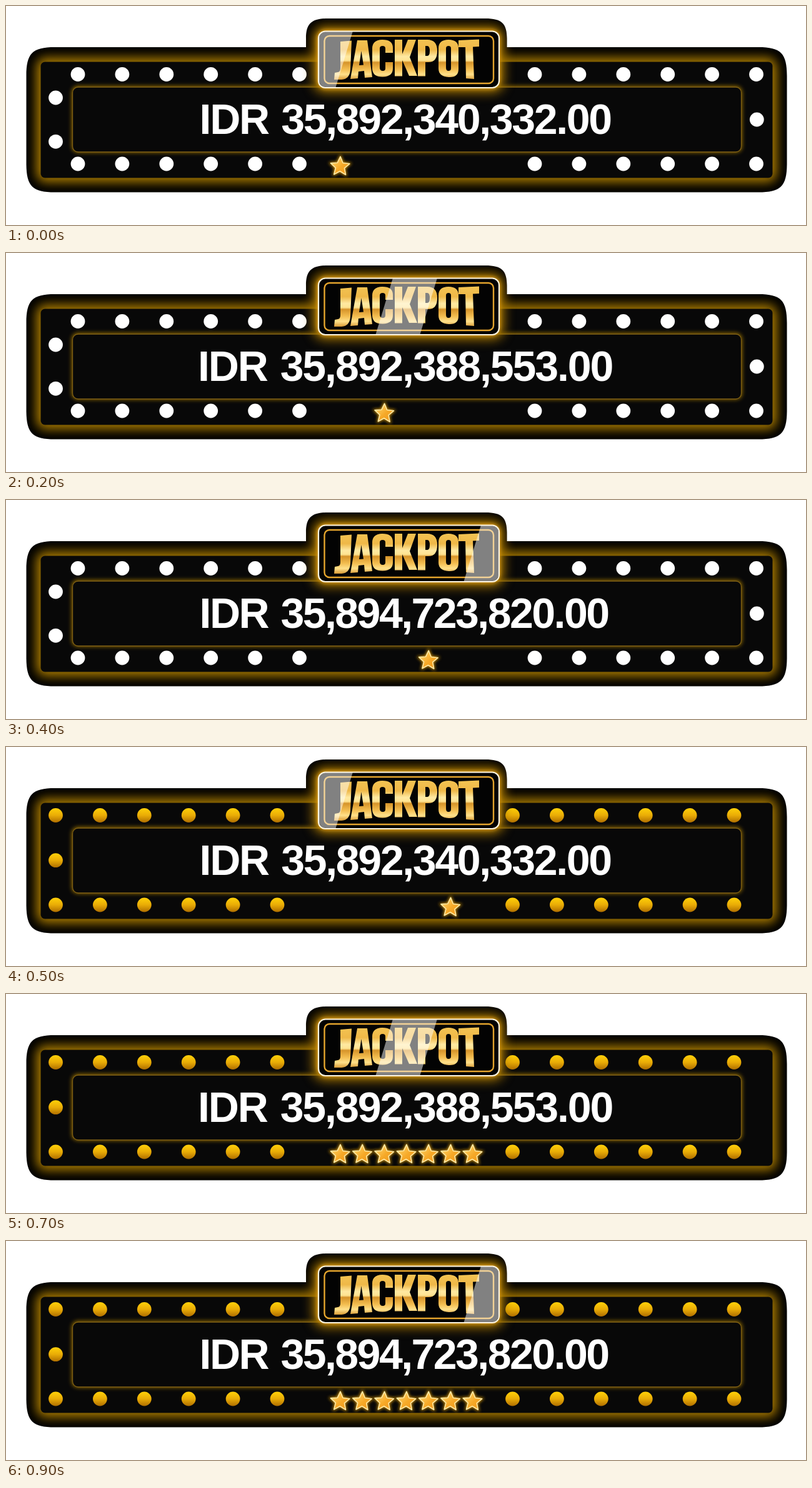
An HTML page for the animation above (1 s loop, 1280x351 px).

```html
<!DOCTYPE html>
<html lang="en">
<head>
<meta charset="utf-8">
<title>Jackpot</title>
<style>
  html, body { margin: 0; width: 100%; height: 100%; overflow: hidden; background: #fff; }
  svg { display: block; width: 1280px; height: 351px; }
  .sum text { font: bold 68px "Liberation Sans", Arial, sans-serif; word-spacing: 4px; fill: #fff; white-space: pre; }
</style>
</head>
<body>
<svg id="stage" viewBox="0 0 1280 351" xmlns="http://www.w3.org/2000/svg">
  <defs>
    <path id="hull" d="M32.5 112C32.5 76 42 66 78 66H480V52C480 28 489 20 515 20H767C793 20 801.5 28 801.5 52V66H1204C1240 66 1249.5 76 1249.5 112V252C1249.5 289 1240 298.5 1204 298.5H78C42 298.5 32.5 289 32.5 252Z"/>
    <clipPath id="hullClip"><use href="#hull"/></clipPath>
    <clipPath id="plateClip"><rect x="501" y="41" width="287" height="89" rx="11"/></clipPath>
    <filter id="wide" x="-20%" y="-40%" width="140%" height="180%"><feGaussianBlur stdDeviation="9"/></filter>
    <filter id="soft" x="-20%" y="-40%" width="140%" height="180%"><feGaussianBlur stdDeviation="3"/></filter>
    <filter id="halo" x="-60%" y="-60%" width="220%" height="220%"><feGaussianBlur stdDeviation="2.6"/></filter>
    <linearGradient id="lamp" x2="0" y2="1">
      <stop stop-color="#ffd008"/><stop offset=".5" stop-color="#e9ac06"/><stop offset="1" stop-color="#b06f00"/>
    </linearGradient>
    <linearGradient id="amber" x2="1" y2="1">
      <stop stop-color="#ffdf7a"/><stop offset=".55" stop-color="#f6a928"/><stop offset="1" stop-color="#ef961a"/>
    </linearGradient>
    <linearGradient id="gold" gradientUnits="userSpaceOnUse" x1="0" y1="54" x2="0" y2="118">
      <stop stop-color="#f3c352"/><stop offset=".25" stop-color="#efb848"/>
      <stop offset=".42" stop-color="#ffe9a2"/><stop offset=".52" stop-color="#ffe391"/>
      <stop offset=".57" stop-color="#d6942a"/><stop offset=".74" stop-color="#f3bd50"/>
      <stop offset=".87" stop-color="#ffe08a"/><stop offset="1" stop-color="#d99b36"/>
    </linearGradient>
  </defs>

  <use href="#hull"/>
  <g clip-path="url(#hullClip)">
    <rect x="49" y="83" width="1184" height="199" rx="14" fill="#b28100" filter="url(#wide)"/>
    <rect x="55.5" y="89.5" width="1171" height="186" rx="7" fill="#080808"/>
    <rect x="105" y="128" width="1073" height="107" rx="10" fill="#8c6800" filter="url(#soft)"/>
    <rect x="106.5" y="130" width="1070" height="104" rx="9" fill="#080808" stroke="#806014" stroke-width="1.3"/>
  </g>

  <g id="lamps"></g>

  <g clip-path="url(#hullClip)">
    <rect x="492" y="33" width="304" height="105" rx="17" fill="#b27e00" filter="url(#wide)"/>
    <rect x="498" y="38.5" width="292" height="94" rx="14" fill="#e6a21c" filter="url(#soft)"/>
  </g>
  <rect x="500" y="40.5" width="289" height="90.5" rx="11" fill="#030303" stroke="#fff6e0" stroke-width="2.2"/>
  <rect x="509.5" y="48" width="270.5" height="76" rx="8" fill="none" stroke="#e5a52d" stroke-width="2.4"/>
  <path role="img" aria-label="JACKPOT" fill="url(#gold)" fill-rule="evenodd" d="
    M535 57L553 55.5L551 102Q550 117 537 118L525 118L526 107L531 106Q535 105.5 535 100Z
    M562 55H578L586 114L574 115L573 104L564 105L563 116L551 117ZM568.5 72L565 95L572 94.5Z
    M619 75V67Q619 54 602 54Q586 54.5 586 68V101Q587 114 603 113.5Q619 113 619 100V90H607V100Q607 104 603 104Q598 104 598 99V68Q598 64 602.5 64Q607 64 607 68V75Z
    M622 54H634V77L643 54H656L646 82L658 112H645L634 87V112.5H622Z
    M659 54H674Q690 54 690 72Q690 90 676 90H671V112.5H659ZM671 64V80H674Q678 80 678 72Q678 64 674 64Z
    M692 68Q692 54 708 54Q724 54 724 68V101Q724 115 708 114Q692 113 692 100ZM704 68V99Q704 104 708 104Q712 104 712 100V68Q712 64 708 64Q704 64 704 68Z
    M724 55L757 53.5V65L747 65.5L749 117L736 116L735 66H724Z"/>
  <g clip-path="url(#plateClip)">
    <path id="shine" d="M0 40H71L43 132H-28Z" fill="#fff" opacity=".5"/>
  </g>

  <g id="sums" class="sum"></g>
  <g id="stars"></g>
</svg>
<script>
const STEP = 100;
const byId = id => document.getElementById(id);

function add(parent, tag, attrs = {}) {
  const el = document.createElementNS('http://www.w3.org/2000/svg', tag);
  for (const key in attrs) el.setAttribute(key, attrs[key]);
  return parent.appendChild(el);
}

// Holds each value for one step, then loops.
function play(el, prop, values) {
  const frames = values.map((v, i) => ({ [prop]: v, offset: i / values.length, easing: 'steps(1, end)' }));
  frames.push({ [prop]: values[values.length - 1], offset: 1 });
  el.animate(frames, { duration: values.length * STEP, iterations: Infinity });
}

// Lamps: two alternating sets
function lampSet(fill, left, right, sides, pattern) {
  const group = add(byId('lamps'), 'g', { fill });
  const dot = (cx, cy) => add(group, 'circle', { cx, cy, r: 11.4 });
  for (const y of [109.5, 253])
    for (let i = 0; i < 6; i++) {
      dot(left + 70.9 * i, y);
      dot(right + 70.9 * i, y);
    }
  sides.forEach(([x, y]) => dot(x, y));
  play(group, 'opacity', pattern);
}
lampSet('#fff', 115, 846, [[79.5, 147], [79.5, 217.3], [1201.3, 182]], [1, 0]);
lampSet('url(#lamp)', 79.5, 810.5, [[79.5, 181.7]], [0, 1]);

// Amounts: text, left edge, tracking
const amounts = [
  ['35,892,340,332', 309.6, -2.34],
  ['35,892,372,496', 310.2, -2.41],
  ['35,892,388,553', 307, -2.09],
  ['35,893,428,724', 310.6, -2.49],
  ['35,894,723,820', 309.6, -2.54]
];
amounts.forEach(([sum, x, track], k) => {
  const label = add(byId('sums'), 'text', { x, y: 205, 'letter-spacing': track });
  label.textContent = `IDR ${sum}.00`;
  play(label, 'opacity', amounts.map((_, i) => +(i === k)));
});

// Sweep of light across the plate
play(byId('shine'), 'transform', [484, 551, 619, 690, 760].map(x => `translateX(${x}px)`));

// Stars: one at a time, then all blink twice
const starPath = Array.from({ length: 10 }, (_, i) => {
  const r = i % 2 ? 7.4 : 16, a = i * Math.PI / 5 + .03;
  return `${(r * Math.sin(a)).toFixed(2)},${(-r * Math.cos(a)).toFixed(2)}`;
}).join(' ');
for (let k = 0; k < 7; k++) {
  const star = add(byId('stars'), 'g');
  const spot = add(star, 'g', { transform: `translate(${534.5 + 35.3 * k} 257.3)` });
  add(spot, 'polygon', { points: starPath, fill: '#d99a10', stroke: '#d99a10', 'stroke-width': 3, filter: 'url(#halo)' });
  add(spot, 'polygon', { points: starPath, fill: 'url(#amber)', stroke: '#ffe9a4', 'stroke-width': 1.6, 'stroke-linejoin': 'round' });
  play(star, 'opacity', Array.from({ length: 10 }, (_, i) => +(i === k || i === 7 || i === 9)));
}
</script>
</body>
</html>
```
